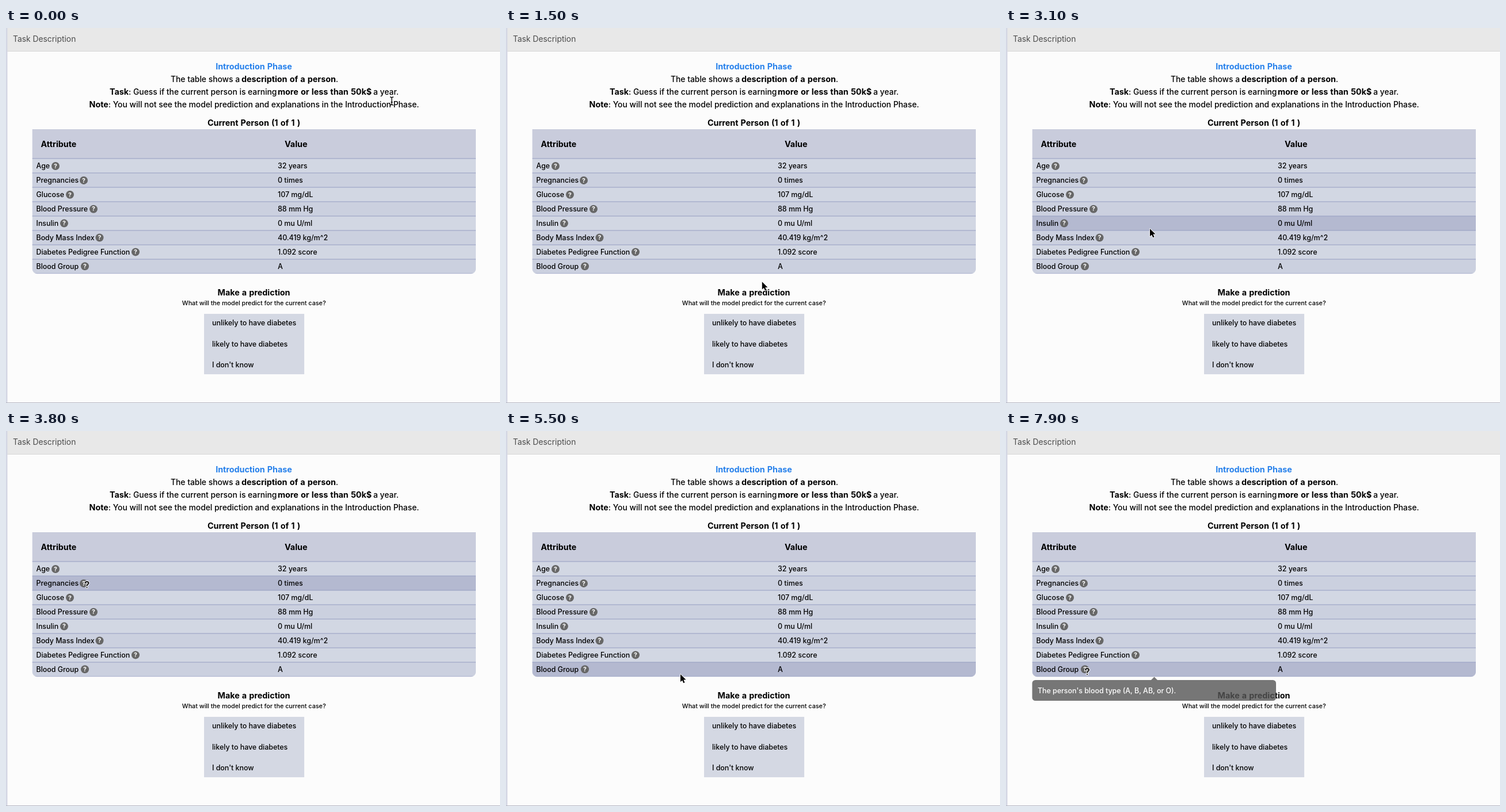
These frames come from a looping animation (858 px wide and 652 px high, 8 s). An HTML page:

```html
<!DOCTYPE html>
<html lang="en">
<head>
<meta charset="utf-8">
<title>Task Description</title>
<style>
  html, body { margin: 0; width: 100%; height: 100%; overflow: hidden; background: #fcfcfc; }
  svg { display: block; width: 100%; height: 100%; font-family: Inter, "Open Sans", sans-serif; font-weight: 500; }
  .head { font-size: 13.85px; font-weight: 400; }
  .body { font-size: 13.85px; }
  .bold { font-size: 14.3px; font-weight: 700; word-spacing: .8px; }
  .row { font-size: 12.4px; }
  .note { font-size: 10.75px; }
  .mid { text-anchor: middle; }
</style>
</head>
<body>
<svg id="stage" viewBox="0 0 858 652" xmlns="http://www.w3.org/2000/svg">
  <defs>
    <clipPath id="tableClip">
      <path d="M45.700 176H816V419.200a8 8 0 0 1-8 8H53.700a8 8 0 0 1-8-8Z"/>
    </clipPath>
  </defs>
  <rect width="858" height="652" fill="#fcfcfc"/>
  <rect width="858" height="40" fill="#e8e8e8"/>
  <rect y="40" width="858" height="1" fill="#d8d8d8"/>
  <rect width="2.500" height="652" fill="#d4d7e4"/>
  <rect y="651" width="858" height="1" fill="#b4b5c0"/>
  <text class="head" x="12" y="23.500" fill="#4c4c4c">Task Description</text>

  <text class="bold mid" x="430.500" y="72" fill="#2680eb">Introduction Phase</text>
  <text class="body" y="93.800"><tspan x="286">The table shows a</tspan><tspan class="bold" x="409">description of a person</tspan><tspan>.</tspan></text>
  <text class="body" y="115.600"><tspan class="bold" x="180">Task</tspan><tspan>: Guess if the current person is earning</tspan><tspan class="bold" x="472">more or less than 50k$</tspan><tspan x="638">a year.</tspan></text>
  <text class="body" y="137.500"><tspan class="bold" x="144.500">Note</tspan><tspan>: You will not see the model prediction and explanations in the Introduction Phase.</tspan></text>
  <text class="bold mid" x="430.500" y="170">Current Person (1 of 1 )</text>

  <g id="table" clip-path="url(#tableClip)">
    <rect x="45" y="176" width="772" height="51" fill="#c9ccdc"/>
  </g>
  <text class="bold" x="60.500" y="206.500">Attribute</text>
  <text class="bold" x="484" y="206.500">Value</text>

  <text class="bold mid" x="430.500" y="465">Make a prediction</text>
  <text class="note mid" x="430.700" y="481.700">What will the model predict for the current case?</text>
  <g id="options"></g>

  <g id="tip">
    <path d="M251.500 6L257.500 0L263.500 6Z" fill="#555"/>
    <rect x="45.500" y="5.500" width="423.500" height="36" rx="5.500" fill="#555"/>
    <text id="tipText" class="row" x="55" y="28" fill="#fff"></text>
  </g>

  <g id="cursors">
    <path id="arrow" d="M0 0V13.200L3.100 10.400L5.300 15.300L7.500 14.300L5.400 9.600H9.600Z" stroke="#fff" stroke-width="1.600" paint-order="stroke" stroke-linejoin="round"/>
    <path id="beam" d="M-3 -7Q0 -7 0 -5V5Q0 7 -3 7M3 -7Q0 -7 0 -5M3 7Q0 7 0 5M-1.500 2H1.500" fill="none" stroke="#000" stroke-width="1.300"/>
    <g id="help" fill="none" stroke-linecap="round">
      <path d="M-3 -2.500C-3 -6 3 -6 3 -2.500C3 -.5 0 -.5 0 2M0 5V5.200" stroke="#fff" stroke-width="4"/>
      <path d="M-3 -2.500C-3 -6 3 -6 3 -2.500C3 -.5 0 -.5 0 2M0 5V5.200" stroke="#111" stroke-width="2"/>
    </g>
  </g>
</svg>
<script>
const LOOP = 8000, STEP = 100;
const TOP = 227, ROW = 25, HOVER = '#b4b9d0';
const OPT = { x: 344, y: 496.5, w: 173.5, h: 35.2, fill: '#d4d8e3' };
const $ = id => document.getElementById(id);

// label, value, centre of the help icon
const rows = [
  ['Age', '32 years', 86],
  ['Pregnancies', '0 times', 135],
  ['Glucose', '107 mg/dL', 111],
  ['Blood Pressure', '88 mm Hg', 152],
  ['Insulin', '0 mu U/ml', 101],
  ['Body Mass Index', '40.419 kg/m^2', 162.5],
  ['Diabetes Pedigree Function', '1.092 score', 225],
  ['Blood Group', 'A', 137]
];
const options = ['unlikely to have diabetes', 'likely to have diabetes', "I don't know"];

// time, x, y of the pointer
const path = [
  [0, 670, 127], [100, 670, 127], [550, 430, 529], [1000, 472, 280],
  [1200, 472, 280], [1700, 430, 529], [2100, 335, 485], [2200, 335, 485],
  [2400, 343, 461], [2600, 344, 446], [2700, 344, 446], [3100, 250, 349],
  [3200, 250, 349], [3800, 140.5, 267], [4600, 140.5, 267], [5100, 192, 300],
  [5500, 303, 423], [6400, 430, 512], [7300, 222, 464], [7900, 141, 418],
  [8000, 141, 418]
];
const tips = [
  { row: 1, from: 3800, to: 4700, text: 'Number of times pregnant.' },
  { row: 7, from: 7750, to: 9000, text: "The person's blood type (A, B, AB, or O)." }
];

function add(parent, tag, attrs, text) {
  const el = document.createElementNS('http://www.w3.org/2000/svg', tag);
  for (const key in attrs) el.setAttribute(key, attrs[key]);
  if (text) el.textContent = text;
  parent.appendChild(el);
  return el;
}

const iconY = i => 240 + i * 24.9;
const rowFill = i => i % 2 ? '#cbd0df' : '#d2d7e3';

const rowRects = rows.map(([label, value, cx], i) => {
  const y = TOP + i * ROW, g = $('table'), base = iconY(i) + 4.4;
  const rect = add(g, 'rect', { x: 45, y, width: 772, height: ROW + 0.5 });
  add(g, 'text', { class: 'row', x: 52.5, y: base }, label);
  add(g, 'text', { class: 'row', x: 472, y: base }, value);
  add(g, 'circle', { cx, cy: iconY(i), r: 7, fill: '#676767' });
  add(g, 'text', { class: 'mid', x: cx, y: iconY(i) + 3.7, fill: '#fff', 'font-size': 10.5, 'font-weight': 700 }, '?');
  return rect;
});
for (let i = 0; i <= rows.length; i++)
  add($('table'), 'rect', { x: 45, y: TOP + i * ROW - 0.5, width: 772, height: 1, fill: '#959dc2' });

const optRects = options.map((label, i) => {
  const y = OPT.y + i * OPT.h;
  const rect = add($('options'), 'rect', { x: OPT.x, y, width: OPT.w, height: OPT.h, 'shape-rendering': 'crispEdges' });
  add($('options'), 'text', { class: 'row', x: 358, y: 517.2 + i * 36.5 }, label);
  return rect;
});

const clamp = v => Math.min(1, Math.max(0, v));
const smooth = u => u * u * (3 - 2 * u);
const fade = u => 1 - Math.pow(1 - clamp(u), 2.3);

function pointer(t) {
  const i = Math.max(1, path.findIndex(p => p[0] >= t));
  const [t0, x0, y0] = path[i - 1], [t1, x1, y1] = path[i];
  const u = smooth((t - t0) / (t1 - t0));
  return [x0 + (x1 - x0) * u, y0 + (y1 - y0) * u];
}

function cursorKind(x, y) {
  if (rows.some((r, i) => Math.hypot(x - r[2], y - iconY(i)) < 8)) return 'help';
  return y < 140 ? 'beam' : 'arrow';
}

function render(t) {
  const [x, y] = pointer(t);
  const hot = Math.floor((y - TOP) / ROW);
  rowRects.forEach((r, i) => r.setAttribute('fill', i === hot ? HOVER : rowFill(i)));

  const inside = x >= OPT.x && x <= OPT.x + OPT.w;
  const pick = inside ? Math.floor((y - OPT.y) / OPT.h) : -1;
  optRects.forEach((r, i) => r.setAttribute('fill', i === pick ? HOVER : OPT.fill));

  const tip = tips.find(p => t >= p.from && t < p.to + 300);
  $('tip').setAttribute('opacity', tip ? fade((t - tip.from) / 300) * (1 - fade((t - tip.to) / 300)) : 0);
  if (tip) {
    $('tip').setAttribute('transform', `translate(0 ${TOP + (tip.row + 1) * ROW + 0.5})`);
    $('tipText').textContent = tip.text;
  }

  const kind = cursorKind(x, y);
  for (const id of ['arrow', 'beam', 'help']) $(id).style.display = id === kind ? '' : 'none';
  $('cursors').setAttribute('transform', `translate(${x} ${y})`);
}

const start = performance.now();
function tick() {
  const t = (performance.now() - start) % LOOP;
  render(Math.floor(t / STEP) * STEP);
  requestAnimationFrame(tick);
}
tick();
</script>
</body>
</html>
```
